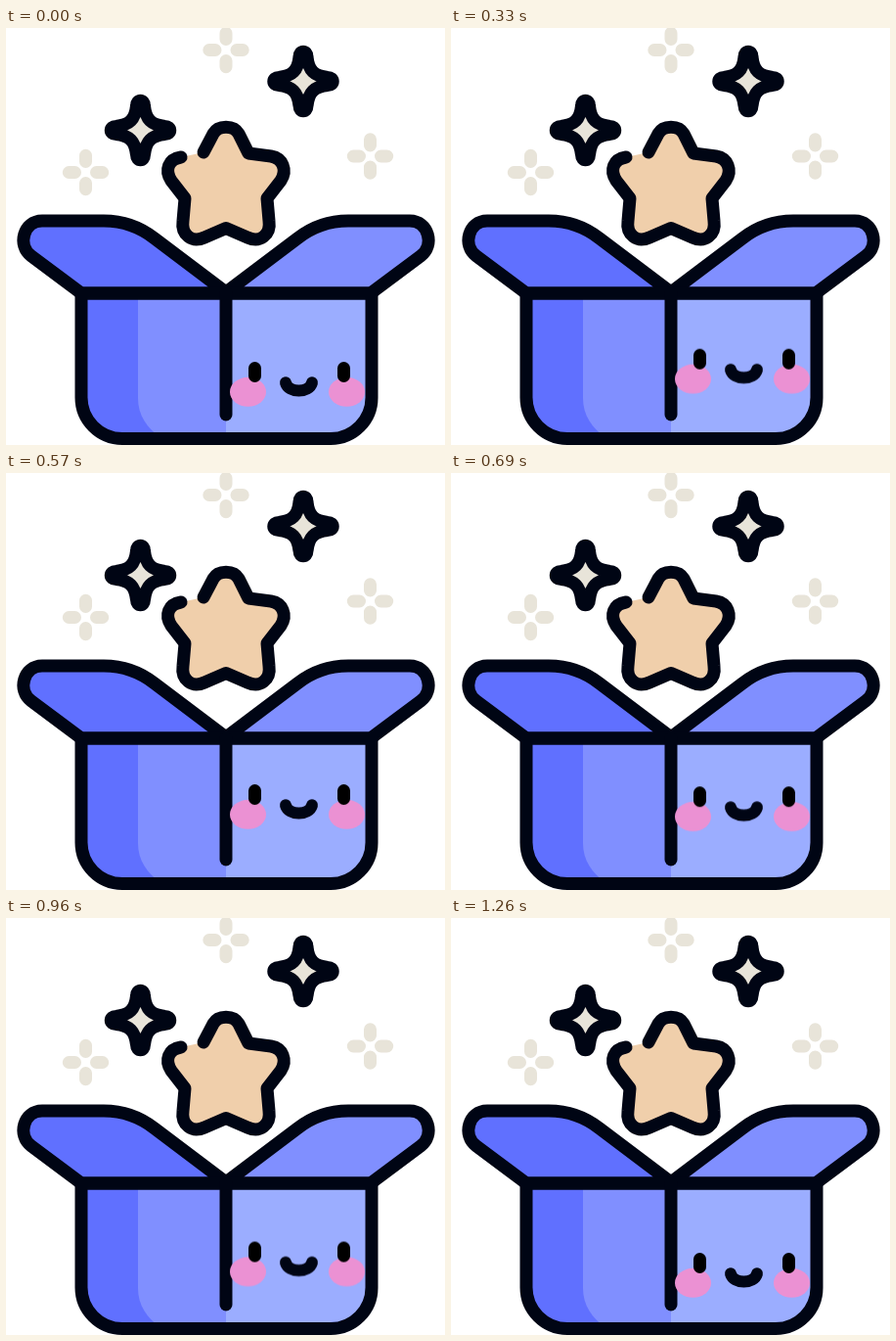
Write an HTML page that moves like this. It is 449 px wide and 426 px high and loops after 2010 ms.

```html
<!DOCTYPE html>
<html lang="en">
<head>
<meta charset="utf-8">
<title>Happy box</title>
<style>
  html, body { margin: 0; width: 100%; height: 100%; overflow: hidden; background: #fff; }
  svg { display: block; width: 449px; height: 426px; }
  .ink { stroke: #000514; stroke-width: 13; stroke-linecap: round; stroke-linejoin: round; }
  .line { fill: none; }
  .dark { fill: #6070ff; }
  .mid { fill: #808fff; }
  .light { fill: #9badff; }
  .cream { fill: #e8e4d9; }
  .dash { fill: none; stroke: #e8e4d9; stroke-width: 13; stroke-linecap: round; }
  #face { animation: nod 2010ms infinite; }
  /* rise for 600 ms, sink until 1260 ms, then rest */
  @keyframes nod {
    0% { transform: translateY(-1px); animation-timing-function: steps(20); }
    29.8507% { transform: translateY(-25.2px); animation-timing-function: steps(22); }
    62.6866%, 100% { transform: translateY(0); }
  }
</style>
</head>
<body>
<svg viewBox="0 0 449 426">
  <defs>
    <path id="body" d="M77 271H374V377A42 42 0 0 1 332 419.500H119A42 42 0 0 1 77 377Z"/>
    <path id="flap" d="M225 270L152 215C138 204 122 197 100 197H37C18 197 11 222 26 233L77 271H225Z"/>
    <path id="spark" d="M-4-25C-4-32 4-32 4-25C5.500-11 11-5.500 25-4C32-4 32 4 25 4C11 5.500 5.500 11 4 25C4 32-4 32-4 25C-5.500 11-11 5.500-25 4C-32 4-32-4-25-4C-11-5.500-5.500-11-4-25Z"/>
    <path id="plus" d="M0-11V-17.200M0 11V17.200M-11 0H-17.200M11 0H17.200"/>
    <clipPath id="inside"><use href="#body"/></clipPath>
  </defs>

  <g class="dash">
    <use href="#plus" x="225" y="22.500"/>
    <use href="#plus" x="81.500" y="147.500"/>
    <use href="#plus" x="372.500" y="131"/>
  </g>
  <g class="ink cream">
    <use href="#spark" x="137.500" y="104.500"/>
    <use href="#spark" x="304" y="54.500"/>
  </g>
  <path class="ink" fill="#f0cfab" d="M202 127L212 108C217 99 233 99 238 108L248 128L271 131C283 133 288 145 281 156L267 174L269 197C271 211 260 220 247 214L225 204.500L203 214C190 220 179 211 181 197L183 174L169 156C162 145 166 134 179 132"/>

  <g clip-path="url(#inside)">
    <path class="dark" d="M70 265H226V426H70Z"/>
    <path class="mid" d="M135 265H226V426H172C148 415 135 399 135 378Z"/>
    <path class="light" d="M225 265H380V426H225Z"/>
  </g>
  <use href="#flap" class="ink dark"/>
  <use href="#flap" class="ink mid" transform="matrix(-1 0 0 1 450 0)"/>
  <use href="#body" class="ink line"/>
  <path class="ink line" d="M225 271V395"/>

  <g id="face">
    <g fill="#eb91d3">
      <ellipse cx="247.500" cy="372.800" rx="18.500" ry="15"/>
      <ellipse cx="348.500" cy="372.800" rx="18.500" ry="15"/>
    </g>
    <path class="ink line" style="stroke:#000" d="M254.500 348.500V356.500M345.500 348.500V356.500"/>
    <path class="ink line" style="stroke-width:12" d="M286 363.300C289 374.300 310 374.300 313 363.300"/>
  </g>
</svg>
</body>
</html>
```
